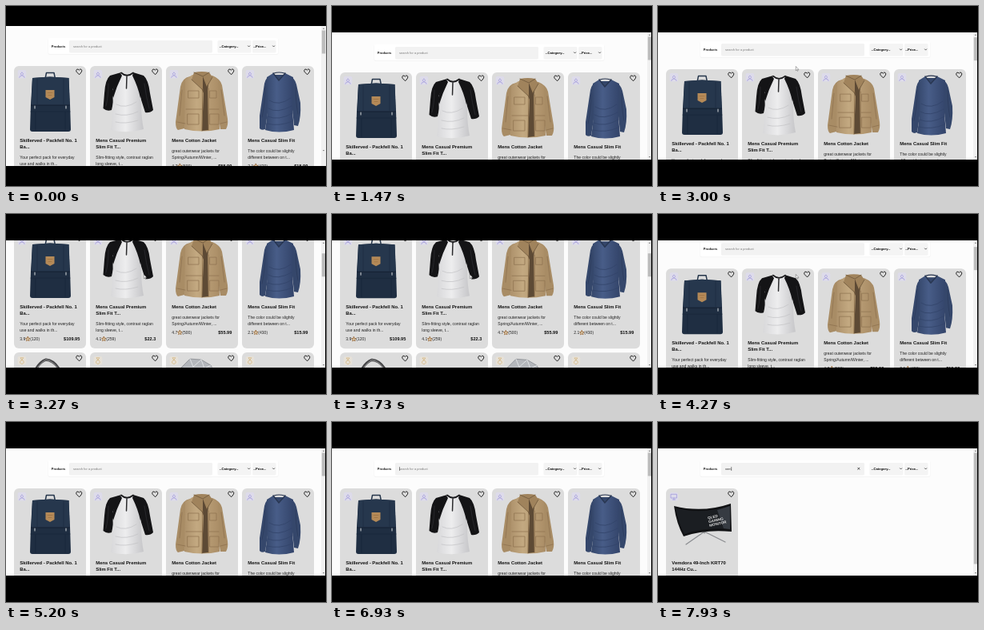
Recreate the animation shown at these times as an HTML page. Size 400 by 225 pixels, loop 8 s.

```html
<!DOCTYPE html>
<html lang="en">
<head>
<meta charset="utf-8">
<title>Shop search</title>
<style>
  html, body { margin: 0; width: 100%; height: 100%; overflow: hidden; background: #000; }
  svg { display: block; width: 100vw; height: 100vh; }
  text { font-family: "Liberation Sans", Arial, sans-serif; fill: #222; white-space: pre; }
  .title { font-size: 5.9px; font-weight: 700; fill: #111; }
  .body { font-size: 5.05px; }
  .price { font-size: 5.6px; font-weight: 700; fill: #111; text-anchor: end; }
  .ui { font-size: 4px; }
  .bold { font-weight: 700; fill: #111; }
  .pick { font-size: 4.15px; font-weight: 700; fill: #000; }
  .hint { fill: #757575; }
</style>
</head>
<body>
<svg viewBox="0 0 400 225">
  <defs>
    <clipPath id="view"><rect id="window"/></clipPath>
    <linearGradient id="denim" x2="1">
      <stop offset="0" stop-color="#34466a"/><stop offset=".4" stop-color="#485d88"/><stop offset="1" stop-color="#33446a"/>
    </linearGradient>
    <linearGradient id="khaki" x2="1">
      <stop offset="0" stop-color="#ad916b"/><stop offset=".35" stop-color="#c3a981"/><stop offset="1" stop-color="#aa8d66"/>
    </linearGradient>
    <linearGradient id="cloth" x2="1">
      <stop offset="0" stop-color="#d8d8da"/><stop offset=".45" stop-color="#ededee"/><stop offset="1" stop-color="#c6c6c9"/>
    </linearGradient>
  </defs>
  <rect width="400" height="225"/>
  <g clip-path="url(#view)">
    <rect width="400" height="225" fill="#fcfcfc"/>
    <g id="page"></g>
    <g id="bar"></g>
  </g>
  <path id="cursor" d="M172.300 75.500v5.200l1.200-1 .8 1.700.8-.4-.8-1.600h1.600z" fill="#fff" stroke="#333" stroke-width=".4"/>
</svg>
<script>
const $ = id => document.getElementById(id);
const text = (cls, x, y, s, id = '') => `<text class="${cls}" id="${id}" x="${x}" y="${y}">${s}</text>`;
const box = (x, y, w, h, fill, r = 0) => `<rect x="${x}" y="${y}" width="${w}" height="${h}" rx="${r}" fill="${fill}"/>`;
const path = (d, fill, stroke = 'none', w = .6) =>
  `<path d="${d}" fill="${fill}" stroke="${stroke}" stroke-width="${w}" stroke-linejoin="round" stroke-linecap="round"/>`;
const line = (d, stroke, w) => path(d, 'none', stroke, w);

const art = {
  none: () => '',
  bag: () =>
    line('M39 16L40.500 8.500H50L51.500 16', '#26364b', 1.500) +
    path('M23 15L45 13.500L68.500 15L70 48L71 79Q71 82 68 82H23Q20 82 20 79L21 48z', '#1f2e42') +
    path('M23 15L45 13.500L68.500 15L69.500 49H21.500z', '#26374d') +
    line('M21.500 49H69.500', '#141f30', 1) + line('M21 57H70M27 58V80M64 58V80', '#18263a', .8) +
    line('M29 16V48M62 16V48', '#1f2f44', 1) +
    path('M39.500 30H50.500V39L45 42L39.500 39z', '#b58a58') + line('M42 33.500H48M43 36.500H47', '#8d6237', .5) +
    line('M26 50V53M65 50V53', '#c8ccd0', 1.100),
  shirt: () =>
    path('M39 8L25 12Q19 17 18 34L16.500 53Q21 57 27 55L31 36L36 14z', '#141416') +
    path('M54 8L67 12Q73 17 75 34L79 55Q75 59 69 58L62 36L56 14z', '#141416') +
    line('M23 22Q23 38 20 50M68 22Q70 38 74 53', '#2a2a2e', .9) +
    path('M38 9Q46 14 54 9L62 26L64 46Q64 64 67 79Q47 85 26 80Q30 55 28 30z', 'url(#cloth)') +
    path('M38 9L34 10L27 34L29 40Q33 26 40 12zM54 9L58 10L65 34L63 40Q60 26 53 12z', '#141416') +
    line('M39 8.500Q46 15 54 8.500', '#18181a', 1.800) + line('M46 13L45.500 28', '#2a2a2c', 1.500) +
    line('M33 48Q44 54 58 45M32 60Q46 64 60 57M32 70Q44 73 60 68', '#c2c2c5', .7),
  jacket: () =>
    path('M30 13Q20 15 18 26L12 70Q12 78 15 80L23 78L28 42L62 42L68 79L75 79Q78 74 77 66L70 24Q68 16 58 12z', '#a88c65') +
    path('M33 11L24 17L23 79Q45 84 67 79L65 17L55 11z', 'url(#khaki)') +
    path('M37 12L55 11L52 30L53 80L45 81L47 34z', '#5d4a35') +
    path('M35 8Q45 6 54 8L58 14L51 26L46 13L46 30L32 17z', '#a0835c') +
    line('M35 8L46 13L54 8M32 17L46 30M58 14L51 26', '#6f583d', .8) +
    line('M46 28L45 81M53 28V80', '#7c6140', .8) +
    line('M28 31H41V40H28zM55 31H63V40H55zM27 60H41V73H27zM55 60H66V73H55zM25 54H45M54 54H66', '#8d7250', .7) +
    line('M20 30L17 62M69 30L73 62M14 70L24 72M68 72L76 70', '#8a6e4c', .7),
  sweater: () =>
    path('M38 11Q30 13 28 22L22 62L22 78Q24 81 29 79L34 45L62 45L65 74L70 75Q74 64 73 46L68 23Q66 14 55 11z', '#35476b') +
    path('M39 9L31 14L32 42Q32 62 29 80Q46 85 65 80Q63 62 63 42L64 14L54 9L46 18z', 'url(#denim)') +
    line('M39 9L46 18L54 9', '#293752', 1.500) + line('M40 9Q46 7 53 9', '#26334d', 1.200) +
    line('M34 43Q46 51 61 40M33 53Q44 60 62 50M32 63Q46 69 63 59M31 72Q47 76 63 69', '#33456a', .8) +
    line('M29 26Q29 46 25 64M67 26Q67 46 70 60', '#2c3b5c', .8),
  chain: () => line('M24 27Q31 12 40 9Q52 10 59 26', '#454547', 3.200) + line('M25 26Q32 13 40 9Q51 11 58 25', '#a2a2a4', .8),
  ring: () => path('M18 20L30 8L44 9L56 16L62 26L30 26z', '#b4b7bc', '#74777d', .6) +
    line('M30 8L34 18L44 9L48 20L56 16M22 19H58', '#e9ebee', .8),
  monitor: () =>
    line('M48 54L25 70M48 54L74 67M48 50V56', '#8b8d91', 1.300) +
    path('M10 22Q46 31 81 19L82 54Q48 51 22 60Q13 44 10 22z', '#111214') +
    path('M12 25Q46 33 80 22L80 51Q48 48 23 57Q16 44 12 25z', '#1b1e22') +
    path('M64 27L80 22L80 51L72 50z', '#363b42') +
    `<g transform="rotate(-12 60 40)" font-weight="700" font-size="4.600">` +
    ['QLED', 'GAMING', 'MONITOR'].map((s, i) =>
      `<text x="53" y="${37 + i * 4.800}" style="fill:#e6e6e6">${s}</text>`).join('') + '</g>'
};

const icons = {
  user: ['#dddbea', line('M9.900 8.200a1.600 1.600 0 1 0 .01 0M6.700 14.400Q6.900 11.900 9.900 11.900T13.100 14.400', '#9a92da', .65)],
  jewel: ['#e6e1d8', line('M9.900 9.500a2.400 2.400 0 1 0 .01 0M8.200 7L9.900 9.300L11.600 7z', '#cfa968', .6)],
  screen: ['#dddbea', line('M6.400 7.300h7v4.700h-7zM9.900 12v2M8.200 14h3.500', '#9a92da', .7)]
};

const star = Array.from({ length: 10 }, (_, i) => {
  const r = i % 2 ? 1.300 : 2.900, a = i * Math.PI / 5;
  return (i ? 'L' : 'M') + (r * Math.sin(a)).toFixed(2) + ' ' + (-r * Math.cos(a)).toFixed(2);
}).join('') + 'z';

function card(col, row, p) {
  const [tint, glyph] = icons[p.icon];
  let s = box(0, 0, 90, 145, '#dcdcdc', 6) + box(4.700, 5, 10.500, 10.500, tint, 2) + glyph +
    art[p.art]() +
    line('M81.300 10.500L78.200 7.400Q77 5.500 78.600 4.200Q80.200 3.400 81.300 5.100Q82.400 3.400 84 4.200Q85.600 5.500 84.400 7.400z', '#111', .9);
  if (p.title) {
    let y = 95;
    p.title.forEach((t, i) => s += text('title', 7.300, y + i * 7.600, t));
    y += p.title.length * 8 + 5;
    p.desc.forEach((t, i) => s += text('body', 7.300, y + i * 8, t));
    y += 19;
    s += text('body', 7.300, y, p.rate) +
      `<g transform="translate(17.300 ${y - 1.800})">${path(star, '#e2d3b8', '#8f571f', .7)}</g>` +
      text('body', 20.300, y, `(${p.count})`) + text('price', 82.300, y, '$' + p.price);
  }
  return `<g transform="translate(${10 + col * 95} ${83 + row * 150})">${s}</g>`;
}

const item = (pic, icon, title, desc, rate, count, price) => ({ art: pic, icon, title, desc, rate, count, price });
const products = [
  item('bag', 'user', ['Skillerved - Packfell No. 1', 'Ba...'], ['Your perfect pack for everyday', 'use and walks in th...'], 3.9, 120, '109.95'),
  item('shirt', 'user', ['Mens Casual Premium', 'Slim Fit T...'], ['Slim-fitting style, contrast raglan', 'long sleeve, t...'], 4.1, 259, '22.3'),
  item('jacket', 'user', ['Mens Cotton Jacket'], ['great outerwear jackets for', 'Spring/Autumn/Winter, ...'], 4.7, 500, '55.99'),
  item('sweater', 'user', ['Mens Casual Slim Fit'], ['The color could be slightly', 'different between on t...'], 2.1, 430, '15.99'),
  ...['chain', 'none', 'ring', 'none'].map(a => item(a, 'jewel'))
];
const found = item('monitor', 'screen', ['Vemdora 49-Inch KRT70', '144Hz Cu...'],
  ['49 inch super ultrawide', 'curved gaming mo...'], 2.2, 140, '999.99');

const chevron = x => line(`M${x} 57.800l1.100 1.200l1.100-1.200`, '#222', .7);
$('page').innerHTML =
  box(52.500, 48.500, 288, 20.500, '#f4f4f4', 2) + box(53, 48, 287, 20, '#fff', 2) +
  text('ui bold', 56.800, 59.500, 'Products') +
  box(79, 51, 179, 15.500, '#f2f2f2', 1.500) +
  text('ui hint', 84, 59.500, 'search for a product', 'hint') + text('ui', 84, 59.500, '', 'query') +
  `<g id="clear">${line('M249.700 57.200l2.200 2.200m0-2.200l-2.200 2.200', '#333', .8)}</g>` +
  `<g id="caret">${box(0, 56, .5, 5, '#222')}</g>` +
  box(264.500, 51, 42, 15.500, '#f4f4f4', 1.500) + text('pick', 266.800, 59.500, '--Category--') + chevron(302.500) +
  box(308, 51, 29.500, 15.500, '#f4f4f4', 1.500) + text('pick', 309.200, 59.500, '--Price--') + chevron(333.500) +
  `<g id="all">${products.map((p, i) => card(i % 4, i >> 2, p)).join('')}</g>` +
  `<g id="hits">${card(0, 0, found)}</g>`;
$('bar').innerHTML = box(394, 0, 6, 225, '#f1f1f1') +
  path('M395.800 36.800l1.200-1.500l1.200 1.500z', '#777') + path('M395.800 188l1.200 1.500l1.200-1.500z', '#777') +
  `<rect id="thumb" x="394.800" width="4.400" fill="#bdbdbd"/>`;

const ease = (t, from, to) => {
  const p = Math.min(1, Math.max(0, (t - from) / (to - from)));
  return p < .5 ? 4 * p ** 3 : 1 - 4 * (1 - p) ** 3;
};
const show = (id, on) => $(id).setAttribute('display', on ? 'inline' : 'none');
const TYPED = [7070, 7330, 7470];
const ADVANCE = [0, 2, 4.200, 7.600];

function draw(t) {
  const tall = t < 1470, top = tall ? 25 : 33, shift = tall ? -8 : 0;
  const scroll = 60.500 * ease(t, 2890, 3330) - 26.500 * ease(t, 3670, 3980) - 34 * ease(t, 4130, 4400);
  const filtered = t >= 7530;
  const n = TYPED.filter(k => t >= k).length;

  $('window').setAttribute('y', top);
  $('window').setAttribute('width', tall ? 400 : 399);
  $('window').setAttribute('height', (tall ? 200 : 192) - top);
  $('page').setAttribute('transform', `translate(0 ${(shift - scroll).toFixed(2)})`);
  $('bar').setAttribute('transform', `translate(0 ${shift})`);
  $('thumb').setAttribute('y', 38.500 + scroll * .18);
  $('thumb').setAttribute('height', filtered ? 139 : 29);

  $('query').textContent = 'vem'.slice(0, n);
  $('caret').setAttribute('transform', `translate(${84 + ADVANCE[n]} 0)`);
  show('caret', t >= 6930);
  show('hint', !n);
  show('clear', n);
  show('all', !filtered);
  show('hits', filtered);
  show('cursor', t >= 2330 && t < 4530);
}

const start = performance.now();
(function tick() {
  draw((performance.now() - start) % 8000);
  requestAnimationFrame(tick);
})();
</script>
</body>
</html>
```
